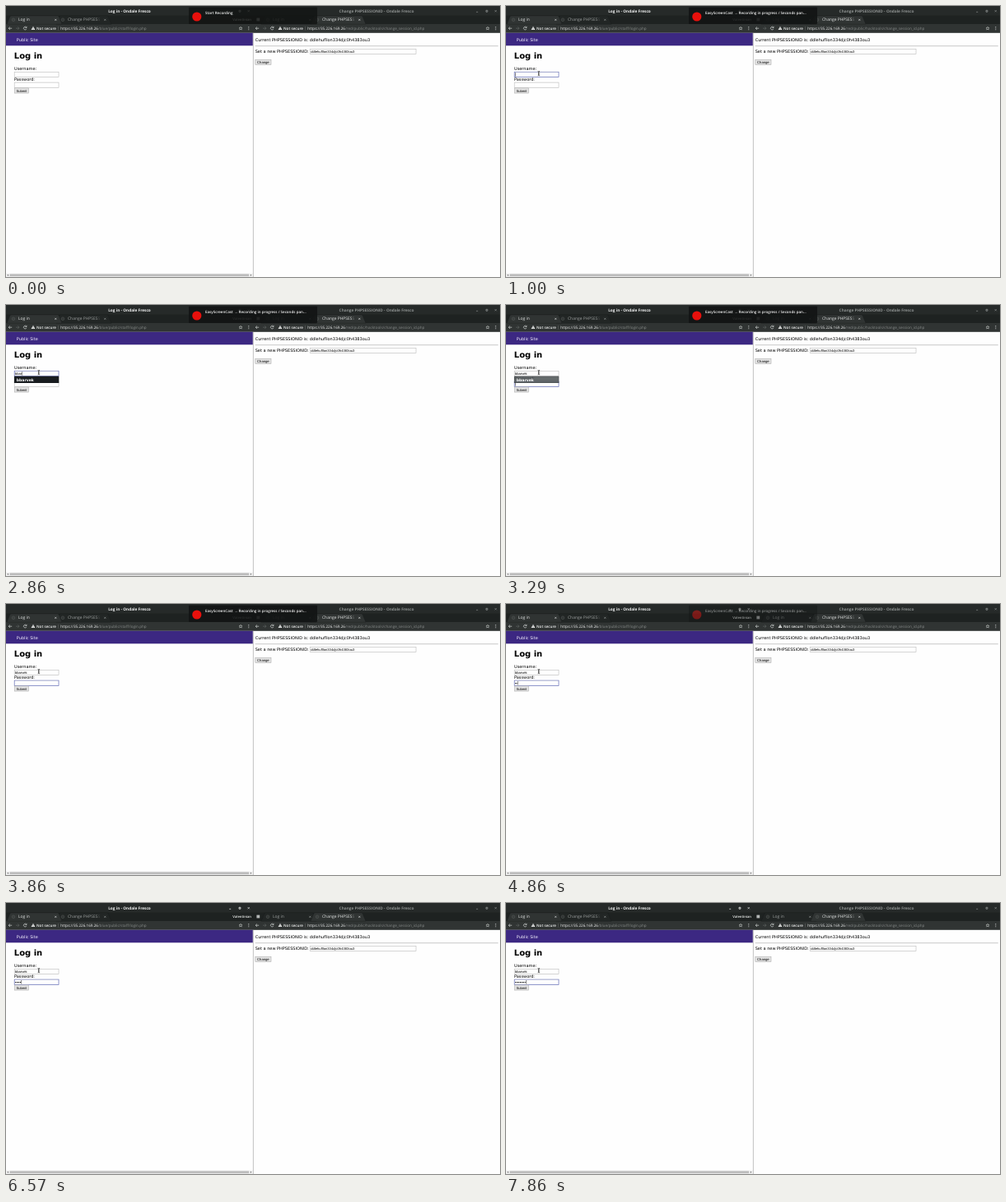
These frames come from a looping animation (600x330 px, 8 s). An HTML page:

```html
<!DOCTYPE html>
<html lang="en">
<head>
<meta charset="utf-8">
<title>Log in</title>
<style>
html, body { margin: 0; width: 100%; height: 100%; overflow: hidden; background: #fff; }
svg { display: block; width: 600px; height: 330px; }
text { white-space: pre; text-rendering: geometricPrecision; }
.ui { font-family: "Open Sans", "Noto Sans", sans-serif; }
.page { font-family: "DejaVu Sans", sans-serif; }
.form { font-family: "Liberation Sans", Arial, sans-serif; }
</style>
</head>
<body>
<svg id="stage" viewBox="0 0 600 330"></svg>
<script>
const LOOP = 8000;
const USER = 'bbarvek';
const APP = 'Ondale Fresco';
const SESSION = 'ddlehufllon334djc0h4383ou3';
const stage = document.getElementById('stage');

function add(parent, tag, attrs) {
  const el = document.createElementNS('http://www.w3.org/2000/svg', tag);
  for (const key in attrs) el.setAttribute(key, attrs[key]);
  return parent.appendChild(el);
}
const group = (parent, attrs = {}) => add(parent, 'g', attrs);
const rect = (parent, x, y, width, height, fill, more = {}) =>
  add(parent, 'rect', { x, y, width, height, fill, ...more });
const line = (parent, d, stroke, width = 0.6) =>
  add(parent, 'path', { d, stroke, fill: 'none', 'stroke-width': width });
function text(parent, font, size, x, y, content, fill = '#000', more = {}) {
  const el = add(parent, 'text', { class: font, 'font-size': size, x, y, fill, ...more });
  el.textContent = content;
  return el;
}
const bold = { 'font-weight': 700 };
const semibold = { 'font-weight': 600 };
const middle = { 'text-anchor': 'middle' };

function cross(parent, x, y, r, color) {
  line(parent, `M${x - r} ${y - r}l${2 * r} ${2 * r}m0 ${-2 * r}l${-2 * r} ${2 * r}`, color);
}

function globe(parent, x, y) {
  add(parent, 'circle', { cx: x, cy: y, r: 1.8, fill: 'none', stroke: '#5c605f', 'stroke-width': 0.5 });
  line(parent, `M${x - 1.8} ${y}h3.6M${x} ${y - 1.8}v3.6`, '#4a4e4d', 0.4);
}

function tab(parent, x, title, active) {
  add(parent, 'path', {
    d: `M${x} 22.2l4 -9.6q.3 -.6 1 -.6h57q.7 0 1 .6l4 9.6z`,
    fill: active ? '#303433' : '#222625',
    stroke: '#161a19', 'stroke-width': 0.3
  });
  const color = active ? '#e6e8e7' : '#9da1a0';
  globe(parent, x + 8, 16.8);
  const label = text(parent, 'ui', 4.95, x + 14, 18.4, title, color);
  if (title.length > 10) {
    const tail = add(label, 'tspan', { 'fill-opacity': 0.35 });
    tail.textContent = 'S';
  }
  cross(parent, x + 59.3, 16.8, 1, color);
}

function chrome(x, width, title, titleColor, path) {
  const g = group(stage, { transform: `translate(${x} 0)` });
  rect(g, 0, 0, width, 12, '#262a29');
  rect(g, 0, 11.5, width, 11, '#1e2221');
  rect(g, 0, 22, width, 10.8, '#303433');
  text(g, 'ui', 4.75, 150, 7.8, title, titleColor, { ...bold, ...middle });

  line(g, 'M271.2 7.3h2', titleColor, 0.7);
  line(g, 'M283 5.3h1.9v1.9h-1.9z', titleColor, 0.8);
  cross(g, 294.7, 6.2, 1.1, titleColor);

  line(g, 'M7.2 27.2h-4m1.7 -1.7l-1.7 1.7l1.7 1.7', '#d5d8d7', 0.7);
  line(g, 'M12 27.2h4m-1.7 -1.7l1.7 1.7l-1.7 1.7', '#666a69');
  line(g, 'M24.7 26.1a1.8 1.8 0 1 0 .2 1.7M25 24.9v1.6h-1.6', '#d5d8d7', 0.7);
  add(g, 'path', { d: 'M33 24.8l2.4 4.3h-4.8z', fill: '#e8eae9' });
  line(g, 'M33 26.2v1.4m0 .4v.5', '#303433', 0.5);
  text(g, 'ui', 4.6, 37, 28.8, 'Not secure', '#f0f2f1', semibold);
  line(g, 'M63.4 24.8v4.8', '#777b7a', 0.4);
  const url = text(g, 'ui', 4.6, 66.3, 28.8, 'https://35.226.169.26', '#f4f5f5');
  add(url, 'tspan', { fill: '#868a89' }).textContent = path;
  line(g, 'M285 25.2l.6 1.3l1.4 .1l-1.1 1l.4 1.4l-1.3 -.8l-1.3 .8l.4 -1.4l-1.1 -1l1.4 -.1z', '#d5d8d7', 0.5);
  for (const y of [25.5, 27.1, 28.7]) {
    add(g, 'circle', { cx: 294.8, cy: y, r: 0.5, fill: '#d5d8d7' });
  }
  return g;
}

function field(x, y, width) {
  const box = rect(stage, x, y, width, 6.3, '#fff', { stroke: '#b9b9b9', 'stroke-width': 0.6 });
  line(stage, `M${x + 0.4} ${y + 0.4}h${width - 0.8}`, '#dedede', 0.3);
  return box;
}

function button(x, y, width, label) {
  rect(stage, x, y, width, 6.2, '#e3e3e3', { stroke: '#a6a6a6', 'stroke-width': 0.5 });
  text(stage, 'form', 4.17, x + width / 2, y + 4.6, label, '#000', middle);
}

rect(stage, 0, 0, 600, 330, '#fefefe');

// Left window
const left = chrome(0, 300, `Log in - ${APP}`, '#f2f3f3', '/blue/public/staff/login.php');
tab(left, 61, 'Change PHPSES', false);
tab(left, 1, 'Log in', true);
text(left, 'ui', 4.15, 298, 18.2, 'Valentinian', '#f0f2f1', { ...semibold, 'text-anchor': 'end' });
rect(stage, 0, 32.8, 299.8, 15.5, '#3c2882');
text(stage, 'page', 5, 12.8, 43, 'Public Site', '#f2effb');
text(stage, 'page', 10, 9.8, 63.9, 'Log in', '#000', bold);
text(stage, 'page', 5, 10, 78.4, 'Username:');
text(stage, 'page', 5, 10, 91.2, 'Password:');
const userBox = field(10.2, 80.3, 53.8);
const passBox = field(10.2, 93.1, 53.8);
button(10.2, 99.9, 17.4, 'Submit');
rect(stage, 0, 325.6, 299.8, 4.4, '#efefef');
rect(stage, 4.5, 326.4, 290.5, 2.8, '#bcbcbc');
add(stage, 'path', { d: 'M3 326.5v2.6l-1.6 -1.3zM296.8 326.5v2.6l1.6 -1.3z', fill: '#777' });

// Right window
const right = chrome(300, 300, `Change PHPSESSIONID - ${APP}`, '#8f9392', '/red/public/hacktools/change_session_id.php');
rect(right, 4.4, 14.6, 3.8, 3.8, '#b4b7b6');
tab(right, 10, 'Log in', false);
tab(right, 70, 'Change PHPSES', true);
text(stage, 'page', 5, 302.7, 42.7, `Current PHPSESSIONID is: ${SESSION}`);
line(stage, 'M302.7 48.7H597.8', '#a5a5a5', 0.6);
text(stage, 'page', 5, 302.7, 56.9, 'Set a new PHPSESSIONID:');
field(369.2, 52.3, 128.8);
text(stage, 'form', 4.17, 370.2, 56.9, SESSION);
button(302.8, 65.4, 19.2, 'Change');
rect(stage, 299.9, 32.8, 0.7, 297.2, '#a8a8a8');

// Form contents
const userText = text(stage, 'form', 4.17, 10.9, 84.7, '');
const passText = text(stage, 'form', 4.17, 10.9, 97.7, '', '#000', bold);
const userCaret = rect(stage, 0, 81.2, 0.45, 4.6, '#000');
const passCaret = rect(stage, 0, 94, 0.45, 4.6, '#000');

const menu = group(stage);
rect(menu, 9.9, 86.7, 54.4, 8.3, '#191d20');
const menuGlow = rect(menu, 10.3, 87.1, 53.6, 7.5, '#4d5355');
text(menu, 'page', 4.6, 12.8, 92.5, USER, '#fff', bold);

// Recording banner
const banner = group(stage);
const bannerBack = rect(banner, 222, 1.5, 156, 20.5, '#121514', { rx: 1 });
add(banner, 'circle', { cx: 231.8, cy: 13, r: 5.6, fill: '#e8100c' });
const bannerText = text(banner, 'ui', 4.5, 242, 9.7, '', '#f2f3f3', semibold);

const arrow = add(stage, 'path', {
  d: 'M0 0v7.6l1.8 -1.7l1.3 2.8l1.2 -.5l-1.3 -2.8h2.5z',
  fill: '#111', stroke: '#fff', 'stroke-width': 0.4
});
const beam = group(stage);
const beamPath = 'M38.6 79.4q1.2 0 1.2 .8v3.8q0 .8 -1.2 .8M41 79.4q-1.2 0 -1.2 .8v3.8q0 .8 1.2 .8';
line(beam, beamPath, '#fff', 1.1);
line(beam, beamPath, '#111', 0.6);

// Each track holds [start time, value] steps
const tracks = {
  typed: [[0, 0], [2000, 1], [2290, 2], [2570, 3], [2860, 4], [3000, 7]],
  dots: [[0, 0], [4290, 1], [4860, 2], [5430, 5], [6000, 15], [6570, 5],
         [7000, 6], [7140, 8], [7570, 7], [7860, 9]],
  focus: [[0, ''], [860, 'user'], [3140, 'pass']],
  caret: [[0, 1], [1570, 0], [2000, 1], [3860, 0], [4140, 1]],
  menu: [[0, 0], [2000, 1], [3290, 0.86], [3430, 0.4], [3570, 0]],
  glow: [[0, 0], [3000, 1]],
  banner: [[0, 1], [4860, 0.45], [5000, 0]],
  shade: [[0, 0.84], [290, 0.9]],
  label: [[0, 'Start Recording'],
          [290, 'EasyScreenCast → Recording in progress / Seconds pan…']],
  // Share of the pointer's way; negative while hidden
  travel: [[0, -1], [140, 0], [290, 0.16], [430, 0.45], [570, 0.75], [710, 0.94], [860, 1]]
};

function at(name, t) {
  let value;
  for (const [start, step] of tracks[name]) {
    if (start > t) break;
    value = step;
  }
  return value;
}

const show = (el, on) => el.setAttribute('opacity', Number(on));

function setField(box, label, caret, content, focused, caretOn) {
  if (label.textContent !== content) label.textContent = content;
  box.setAttribute('stroke', focused ? '#5f69b4' : '#b9b9b9');
  box.setAttribute('stroke-width', focused ? 0.7 : 0.6);
  const width = content ? label.getComputedTextLength() : 0;
  caret.setAttribute('x', 11 + width);
  show(caret, focused && caretOn);
}

function render(t) {
  const focus = at('focus', t);
  const caretOn = at('caret', t);
  setField(userBox, userText, userCaret, USER.slice(0, at('typed', t)), focus === 'user', caretOn);
  setField(passBox, passText, passCaret, '•'.repeat(at('dots', t)), focus === 'pass', caretOn);

  show(menu, at('menu', t));
  show(menuGlow, at('glow', t));
  show(banner, at('banner', t));
  show(bannerBack, at('shade', t));
  bannerText.textContent = at('label', t);

  const p = at('travel', t);
  show(arrow, p >= 0 && p < 1);
  show(beam, p === 1);
  arrow.setAttribute('transform', `translate(${486 - 446 * p} ${266 - 184 * p})`);
}

const begin = performance.now();
function tick() {
  render((performance.now() - begin) % LOOP);
  requestAnimationFrame(tick);
}
tick();
</script>
</body>
</html>
```
